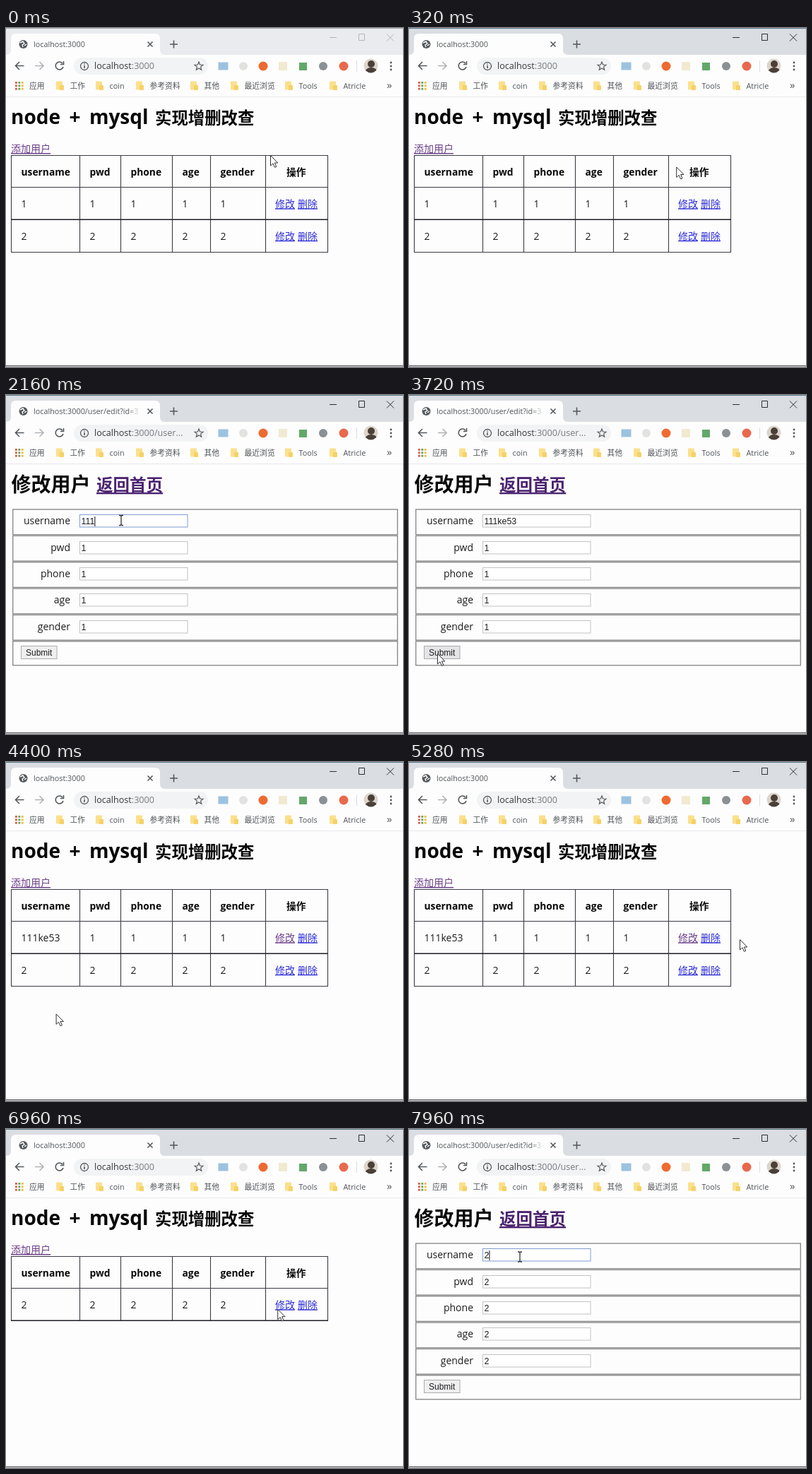
An HTML page for the animation above (8 s loop, 562 by 480 pixels).

```html
<!DOCTYPE html>
<html lang="zh-CN">
<head>
<meta charset="utf-8">
<title>node + mysql</title>
<style>
html, body { margin: 0; width: 100%; height: 100%; overflow: hidden; background: #fdfdfd; }
svg { display: block; width: 562px; height: 480px; }
text { font: 14px "Open Sans", "Noto Sans CJK SC", "Noto Sans CJK", sans-serif; fill: #1c1c1e; white-space: pre; }
.ui { font-size: 10.8px; fill: #505458; }
.url { font-size: 12.6px; fill: #777b80; }
.bold { font-size: 13.8px; font-weight: 700; fill: #080808; }
.link { text-decoration: underline; }
.field { font-family: "Liberation Sans", Arial, sans-serif; font-size: 12.4px; }
.icon { fill: none; stroke: #54585c; stroke-width: 1.6; }
</style>
</head>
<body>
<svg viewBox="0 0 562 480">
  <defs>
    <linearGradient id="fade" gradientUnits="userSpaceOnUse" x1="172" x2="191" y1="0" y2="0">
      <stop stop-color="#505458"/><stop offset="1" stop-color="#505458" stop-opacity="0"/>
    </linearGradient>
    <clipPath id="face"><circle cx="516.5" cy="53.5" r="10"/></clipPath>
  </defs>
  <rect width="562" height="480" fill="#fdfdfd"/>
  <g id="chrome"></g>
  <g id="home"></g>
  <g id="edit"></g>
  <path d="M0 478.5H562" stroke="#20242c"/>
  <g id="cursor" stroke="#303034" stroke-linejoin="round">
    <path id="arrow" fill="#fff" d="M.5.5V15L4 11.8L6.4 17.3L8.8 16.3L6.4 11H10.8Z"/>
    <path id="hand" fill="#fff" d="M-1.5 10V1.5Q0-.8 1.5 1.5V7Q3 5.8 4.2 7.4Q5.8 6.5 6.8 8.2Q8.7 7.8 8.7 10V14L7 19H-1L-5.5 12.5Q-5.5 9.5-3 11.2Z"/>
    <path id="beam" fill="none" stroke-width="1.3" d="M-3-7H-1L0-6L1-7H3M0-6V6M-3 7H-1L0 6L1 7H3"/>
  </g>
</svg>
<script>
const $ = id => document.getElementById(id);
const text = (x, y, str, cls = "", attrs = "") => `<text x="${x}" y="${y}" class="${cls}" ${attrs}>${str}</text>`;
const rect = (x, y, w, h, fill, attrs = "") => `<rect x="${x}" y="${y}" width="${w}" height="${h}" fill="${fill}" ${attrs}/>`;
const circle = (x, y, r, fill, attrs = "") => `<circle cx="${x}" cy="${y}" r="${r}" fill="${fill}" ${attrs}/>`;
const path = (d, attrs = 'class="icon"') => `<path d="${d}" ${attrs}/>`;

const LINK = "#2c2cd8", VISITED = "#6a3d88", ACTIVE = "#ee2a1c";
const COLUMNS = [7.5, 104.5, 162.5, 235.5, 289.5, 367.5, 455.5];
const FIELDS = ["username", "pwd", "phone", "age", "gender"];
const NEW_NAME = "111ke53";
const TYPED_AT = [1960, 2120, 2320, 2520, 2720, 2880];

function buildChrome() {
  const folders = [[71, "工作"], [127, "coin"], [184, "参考资料"], [261, "其他"], [318, "最近浏览"], [395, "Tools"], [458, "Atricle"]];
  const appColors = ["#e0584a", "#55a860", "#eeb93a", "#4f86d8"];
  let apps = "";
  for (let i = 0; i < 9; i++) apps += rect(13 + i % 3 * 4.4, 76 + Math.floor(i / 3) * 4.4, 2.8, 2.8, appColors[(i + Math.floor(i / 3)) % 4]);
  $("chrome").innerHTML =
    rect(0, 0, 562, 38, "", 'id="titlebar"') +
    path("M0 .5H562", 'id="topline"') +
    path("M0 38Q7 38 7 31V15Q7 8 14 8H211Q218 8 218 15V31Q218 38 225 38H562V97H0Z", 'fill="#fdfdfd"') +
    path("M0 97.5H562", 'stroke="#e9eaec"') +
    circle(24.5, 23, 6, "#54585c") +
    path("M20 21L24 19L26 22L23 24L24 27M26 25L29 23", 'fill="none" stroke="#fdfdfd" stroke-width="1.4"') +
    text(39, 27, "", "ui", 'id="tabtitle"') +
    path("M200.5 19.5L207.5 26.5M207.5 19.5L200.5 26.5M232 23H243M237.5 17.5V28.5") +
    path("M458 13.5H468M499.5 8.5H507.5V17.5H499.5ZM539 8.5L549 18.5M549 8.5L539 18.5", 'id="controls" fill="none"') +
    path("M25.5 53.5H13.5M19 48L13.5 53.5L19 59M80 50A5.5 5.5 0 1 0 81 55M81.5 47V51.5H77") +
    path("M41 53.5H53M47.5 48L53 53.5L47.5 59", 'class="icon" style="stroke:#b0b3b6"') +
    rect(96, 42, 190, 24, "#f1f3f4", 'rx="12"') +
    circle(111, 54, 5.5, "none", 'stroke="#54585c" stroke-width="1.3"') +
    path("M111 53V57M111 50.5V51.7") +
    text(125, 58.2, "", "url", 'id="address"') +
    path("M273 48L274.6 52L279 52.3L275.6 55.1L276.7 59.3L273 57L269.3 59.3L270.4 55.1L267 52.3L271.4 52Z", 'class="icon" style="stroke-width:1.2"') +
    rect(300.5, 48.5, 14, 11, "#9cc2e0") + circle(336, 54, 6, "#e2e2e0") +
    circle(364, 54, 6.5, "#ee6a30") + rect(386, 48, 12, 12, "#f1ead0") +
    rect(415, 49, 11, 11, "#62a868") + circle(449, 54, 6, "#8b9094") + circle(478, 54, 6.5, "#e8694c") +
    path("M496.5 46V62", 'stroke="#dadcde"') +
    `<g clip-path="url(#face)">${rect(506, 43, 21, 21, "#ddd4cc")}${circle(517, 51, 5, "#4a4038")}${path("M507 66Q508 56 517 56Q526 56 527 66Z", 'fill="#4a4038"')}</g>` +
    [49, 54, 59].map(y => circle(545, y, 1.4, "#54585c")).join("") +
    apps + text(33, 86, "应用", "ui") +
    folders.map(([x, name]) =>
      rect(x, 75.5, 9, 12, "#fbe08c", 'rx="1"') + rect(x + 5, 81, 6, 7, "#f5d268", 'rx="1"') +
      text(x + 19.5, 86, name, "ui")).join("") +
    text(539, 86, "»", "ui", 'style="font-size:15px"');
}

function buildHome() {
  const row = (y, id) => `<g id="${id}">` +
    COLUMNS.slice(0, 5).map(x => text(x + 14, y, "", "cell")).join("") +
    text(381, y, "修改", "link") + text(413, y, "删除", "link", `style="fill:${LINK}"`) + "</g>";
  $("home").innerHTML =
    text(7, 136, "node + mysql", "bold", 'style="font-size:28px;word-spacing:5.2px"') +
    text(211, 136, "实现增删改查", "bold", 'style="font-size:23.4px"') +
    text(7, 176, "添加用户", "link", `style="fill:${VISITED}"`) +
    path("", 'id="grid" fill="none" stroke="#3c3c46" stroke-width="1.1"') +
    path("M7 271.3H456", 'stroke="#1c1c26" stroke-width="1.5"') +
    FIELDS.map((name, i) => text(COLUMNS[i] + 14, 208.5, name, "bold")).join("") +
    text(397, 208.5, "操作", "bold") +
    row(254.3, "row1") + row(299.8, "row2");
}

function buildEdit() {
  let rows = "";
  for (let i = 0; i < 6; i++) {
    const y = 162 + i * 37.35;
    rows += rect(9.7, y, 544.6, i < 5 ? 35.7 : 34, "none", 'stroke="#8c8c8e" stroke-width="1.4"');
    if (i < 5) rows += text(91, y + 21.3, FIELDS[i], "", 'text-anchor="end"') +
      rect(104.5, Math.round(y + 7.3) + .5, 152.5, 17.5, "#fff", 'class="box"') +
      text(106.5, y + 21.2, "", "field value");
  }
  $("edit").innerHTML =
    text(7.5, 136.5, "修改用户", "bold", 'style="font-size:28px"') +
    text(128, 136, "返回首页", "bold link", 'style="font-size:23.5px;fill:#4b2370"') +
    rows +
    rect(21.5, 355.5, 50.5, 18, "", 'id="button" stroke="#acacae"') +
    text(28, 369, "Submit", "field", 'style="font-size:12px"') +
    path("", 'id="caret" stroke="#202024" stroke-width="1.1"');
}

// time, x, y of the pointer's hot spot
const POINTER = [
  [0, 374, 180], [120, 374, 180], [720, 390, 243], [1120, 390, 243], [1720, 163, 177.5],
  [2900, 163, 177.5], [3260, 66, 408], [3640, 40, 366], [4300, 40, 366], [4720, 250, 300],
  [5080, 402, 215], [5280, 468, 251], [5440, 468, 251], [5720, 427, 246], [6160, 427, 246],
  [6440, 420, 312], [6920, 384, 255], [7200, 388, 250], [7680, 157, 181], [8000, 157, 181]
];

function pointerAt(t) {
  const i = POINTER.findIndex(p => p[0] > t);
  const [t0, x0, y0] = POINTER[i - 1], [t1, x1, y1] = POINTER[i];
  const u = (t - t0) / (t1 - t0), k = u * u * (3 - 2 * u);
  return [x0 + (x1 - x0) * k, y0 + (y1 - y0) * k];
}

const within = (t, a, b) => t >= a && t < b;
const show = (id, on) => $(id).style.display = on ? "" : "none";

function fillRow(id, name, rest, linkColor) {
  const cells = $(id).querySelectorAll("text");
  for (let i = 0; i < 5; i++) cells[i].textContent = i ? rest : name;
  cells[5].style.fill = linkColor;
}

function drawHome(t) {
  const saved = t > 3000, deleted = t >= 6080;
  const bottom = deleted ? 271.5 : 317.5;
  $("grid").setAttribute("d",
    COLUMNS.map(x => `M${x} 180V${bottom}`).join("") +
    [180.5, 225.5, bottom].map(y => `M7 ${y}H456`).join(""));
  if (deleted) fillRow("row1", "2", "2", within(t, 7080, 7240) ? ACTIVE : LINK);
  else fillRow("row1", saved ? NEW_NAME : "1", "1", within(t, 880, 1040) ? ACTIVE : saved ? VISITED : LINK);
  fillRow("row2", "2", "2", LINK);
  show("row2", !deleted);
}

function drawEdit(t) {
  const second = t > 5000, base = second ? "2" : "1";
  const typed = TYPED_AT.filter(at => t >= at);
  const name = second ? base : NEW_NAME.slice(0, 1 + typed.length);
  const focusedAt = second ? 7720 : 1760;
  const focused = t >= focusedAt && (second || t < 3680);
  const values = document.querySelectorAll(".value");
  values.forEach((el, i) => el.textContent = i ? base : name);
  document.querySelectorAll(".box").forEach((el, i) =>
    el.setAttribute("stroke", i === 0 && focused ? "#7f9bd0" : "#c2c2c4"));
  $("button").setAttribute("fill", within(t, 3640, 3900) ? "#e4e4e6" : "#efeff0");
  const blinkStart = second || !typed.length ? focusedAt : typed[typed.length - 1];
  show("caret", focused && (t - blinkStart) % 1000 < 500);
  const x = 107 + values[0].getComputedTextLength();
  $("caret").setAttribute("d", `M${x} 172V186`);
}

function draw(t) {
  const active = t >= 40;
  const editing = within(t, 1040, 3920) || t >= 7240;
  $("titlebar").setAttribute("fill", active ? "#dadde2" : "#e9ebee");
  $("topline").setAttribute("stroke", active ? "#56788c" : "#a4a8ac");
  $("controls").setAttribute("stroke", active ? "#2c2e32" : "#b4b7ba");
  $("tabtitle").textContent = editing ? "localhost:3000/user/edit?id=3" : "localhost:3000";
  $("tabtitle").style.fill = editing ? "url(#fade)" : "";
  $("address").innerHTML = '<tspan fill="#36393d">localhost</tspan>:3000' + (editing ? "/user..." : "");
  show("home", !editing);
  show("edit", editing);
  editing ? drawEdit(t) : drawHome(t);

  const [x, y] = pointerAt(t);
  const overLink = within(t, 680, 1040) || within(t, 5640, 6200) || within(t, 7000, 7240);
  const overField = editing && within(x, 104, 257) && within(y, 168, 188);
  show("hand", overLink);
  show("beam", overField);
  show("arrow", !overLink && !overField);
  $("cursor").setAttribute("transform", `translate(${x} ${y})`);
}

buildChrome();
buildHome();
buildEdit();
const start = performance.now();
function tick() {
  draw((performance.now() - start) % 8000);
  requestAnimationFrame(tick);
}
tick();
</script>
</body>
</html>
```
